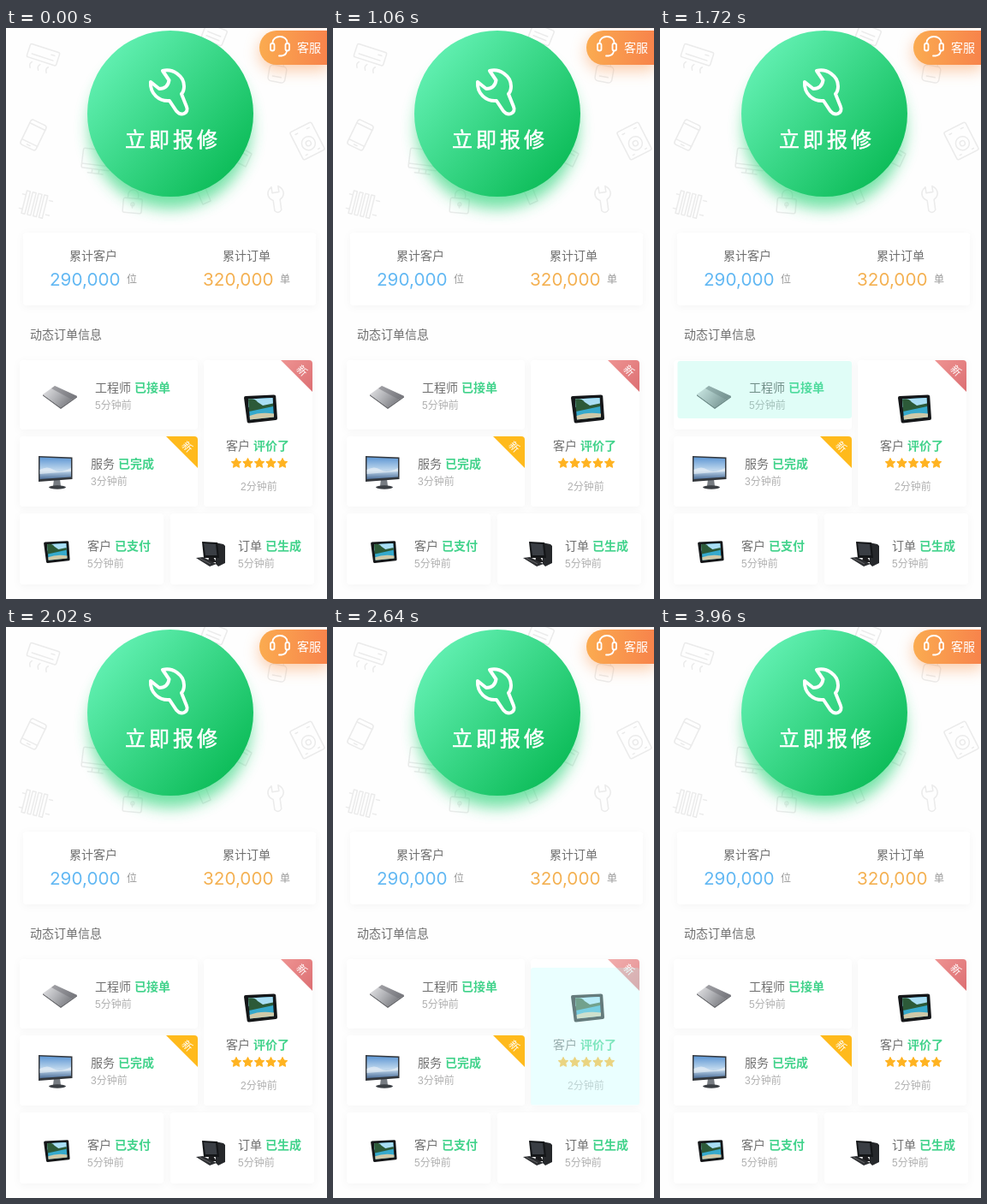
Recreate the animation shown at these times as an HTML page. Size 375x667 px, loop 3980 ms.

```html
<!DOCTYPE html>
<html lang="zh-CN">
<head>
<meta charset="utf-8">
<style>
html, body { margin: 0; width: 100%; height: 100%; overflow: hidden; background: #fefefe; }
svg { display: block; width: 375px; height: 667px; }
text { font: 14px "Liberation Sans", "Noto Sans CJK SC", "Noto Sans CJK", sans-serif; fill: #707070; }
.ok { font-weight: bold; fill: #43d38c; }
.ago, .unit { font-size: 12px; fill: #b0b0b0; }
.unit { fill: #999; }
.num { font: 20.7px Inter, sans-serif; }
.new { font-size: 12px; fill: #fff; text-anchor: middle; }
.big { font-size: 24px; letter-spacing: 4px; fill: #fff; stroke: #fff; stroke-width: .6; }
.card { fill: #fff; filter: drop-shadow(0 2px 5px rgba(0,0,0,.035)); }
.faint { fill: none; stroke: #ebebeb; stroke-width: 1.5; stroke-linejoin: round; stroke-linecap: round; }
.line { fill: none; stroke: #fff; stroke-linejoin: round; stroke-linecap: round; }
</style>
</head>
<body>
<svg viewBox="0 0 375 667">
  <defs>
    <linearGradient id="green" x1=".1" y1=".15" x2=".9" y2=".85">
      <stop stop-color="#62f0b2"/><stop offset="1" stop-color="#0cbc58"/>
    </linearGradient>
    <linearGradient id="orange">
      <stop stop-color="#fbab50"/><stop offset="1" stop-color="#f7834b"/>
    </linearGradient>
    <linearGradient id="red" x2="1" y2="1">
      <stop stop-color="#ee9392"/><stop offset="1" stop-color="#dc6e72"/>
    </linearGradient>
    <linearGradient id="sky" x2="0" y2="1">
      <stop stop-color="#5f97d4"/><stop offset=".6" stop-color="#c3daee"/><stop offset="1" stop-color="#4d6f9a"/>
    </linearGradient>
    <linearGradient id="metal" y2=".5">
      <stop stop-color="#e9e9eb"/><stop offset=".5" stop-color="#b4b5b9"/><stop offset="1" stop-color="#77787d"/>
    </linearGradient>
    <filter id="blur" x="-40%" y="-60%" width="180%" height="220%"><feGaussianBlur stdDeviation="9"/></filter>
    <path id="wrench" d="M183 50C195 47 208 56 208 68Q208 74 205 77L211 92C214 99 205 104 199 97L191 85C179 86 168 77 169 63L179 71Q189 71 190.500 61Z"/>
    <g id="tablet">
      <path d="M278 432Q278 430 280 430L313 428.500Q315 428.500 315.200 430L317 456Q317 458 315 458L284 461.500Q282 461.500 281.700 460Z" fill="#151719"/>
      <path d="M283 433.500 311.500 432 313 454.500 285 457.500Z" fill="#35a9cc"/>
      <path d="M283 433.500 311.500 432 312 440 283.500 443Z" fill="#a9def4"/>
      <path d="M283 433.500Q291 432 294 437L300 441 312 438.500V442L284 448Z" fill="#2c5a38"/>
      <path d="M284.600 453Q297 448 313 450.500V454.500L285 457.500Z" fill="#cfc9a8"/>
    </g>
  </defs>
  <rect width="375" height="667" fill="#fefefe"/>

  <g class="faint">
    <g transform="translate(42 36) rotate(18)">
      <rect x="-18" y="-13" width="36" height="16" rx="2"/>
      <path d="M-13-2H13M-10 7q-3 3 0 7M0 7q-3 3 0 7M10 7q-3 3 0 7M9-8h4"/>
    </g>
    <g transform="translate(32 125) rotate(26)">
      <rect x="-10" y="-16" width="20" height="32" rx="3"/><path d="M-10-11H10M-10 10H10M-2 13H2"/>
    </g>
    <g transform="translate(35 206) rotate(14)">
      <path d="M-18-8h4M14-8h4M-18 9h4M14 9h4"/>
      <path d="M-14-13h4v27h-4zM-7-13h4v27h-4zM0-13h4v27H0zM7-13h4v27H7z"/>
    </g>
    <g transform="translate(106 155) rotate(7)">
      <rect x="-17" y="-13" width="34" height="23" rx="2"/><path d="M-17 5H17M-4 10v5M4 10v5M-9 15H9"/>
    </g>
    <g transform="translate(148 204) rotate(5)">
      <rect x="-11" y="-5" width="22" height="17" rx="2"/><path d="M-6-5v-4a6 6 0 0 1 12 0v4M0 2v4"/><circle r="2" cy="2"/>
    </g>
    <g transform="translate(352 132) rotate(-27)">
      <rect x="-14" y="-18" width="28" height="36" rx="2"/><circle r="8" cy="3"/><circle r="3" cy="3"/><path d="M-9-13h3M6-13h3M-9 14h2M7 14h2"/>
    </g>
    <g transform="translate(243 8) rotate(22)">
      <rect x="-13" y="-10" width="26" height="19" rx="2"/><path d="M-8 4H8M-8-1H8"/>
    </g>
    <g transform="translate(317 53) rotate(10)">
      <rect x="-10" y="-9" width="20" height="19" rx="4"/><path d="M-6-9l2-6h8l2 6M-5 4H5"/>
    </g>
    <path d="M273 139l14 8-7 15-12-6M277 146l5 3"/>
    <path d="M223 190l10-3 6 15-9 4z"/>
    <g transform="translate(316 200) rotate(-8)">
      <path d="M-4-15v7h8v-7q6 4 5 10-1 4-5 6V13q-4 5-8 0V1q-4-2-5-6-1-6 5-10z"/>
    </g>
  </g>

  <circle cx="192" cy="117" r="94" fill="#35d67f" opacity=".7" filter="url(#blur)"/>
  <circle cx="192" cy="100" r="97" fill="url(#green)"/>
  <use href="#wrench" class="line" stroke-width="4"/>
  <text class="big" x="139" y="139">立即报修</text>

  <path d="M376 9H316a20 20 0 0 0 0 40h60z" fill="#f99650" opacity=".5" filter="url(#blur)"/>
  <path d="M376 3H316a20 20 0 0 0 0 40h60z" fill="url(#orange)"/>
  <g class="line" stroke-width="1.800">
    <path d="M311.500 18v-1a8.500 7 0 0 1 17 0v1M328 27q-1 5-6 5.500M319 32.500h3"/>
    <rect x="309" y="18" width="4.500" height="8.500" rx="2"/><rect x="326.500" y="18" width="4.500" height="8.500" rx="2"/>
  </g>
  <text x="340" y="28" style="fill:#fff">客服</text>

  <rect class="card" x="20" y="239" width="342" height="85" rx="4"/>
  <text x="74" y="271">累计客户</text>
  <text x="253" y="271">累计订单</text>
  <text class="num" x="51" y="301" style="fill:#62b8f3">290,000</text>
  <text class="num" x="230" y="301" style="fill:#f4b152">320,000</text>
  <text class="unit" x="141" y="298">位</text>
  <text class="unit" x="320" y="298">单</text>
  <text x="28" y="363">动态订单信息</text>

  <rect class="card" x="16" y="388" width="208" height="81" rx="4"/>
  <rect class="card" x="231" y="388" width="127" height="171" rx="4"/>
  <rect class="card" x="16" y="477" width="208" height="82" rx="4"/>
  <rect class="card" x="16" y="567" width="168" height="83" rx="4"/>
  <rect class="card" x="192" y="567" width="168" height="83" rx="4"/>

  <path d="M43 428 64 443 83 430V431.500L64 445 43 429.500Z" fill="#66676b"/>
  <path d="M43 428 57 418 83 430 64 443.500Z" fill="url(#metal)"/>
  <path d="M57 418 83 430 77 434 53 421Z" fill="#6f7075" opacity=".5"/>

  <path d="M56 527h7l1 8h-9z" fill="#777c82"/>
  <ellipse cx="60" cy="536.500" rx="10" ry="2.200" fill="#3c4045"/>
  <path d="M38 500 77.500 501.500V527L38 530Z" fill="#33373c"/>
  <path d="M39.500 501.500 76 503V524.500L39.500 527Z" fill="url(#sky)"/>
  <path d="M39.500 516q9-5 16 0t20.500-2v4l-36.500 3z" fill="#eef4f8" opacity=".6"/>

  <use href="#tablet" transform="translate(-172.700 265) scale(.78)"/>

  <path d="M244 601 254 603 256 605V625L248 629 245 626Z" fill="#26282b"/>
  <path d="M229 600 247 601 249 619 231 619Z" fill="#141618"/>
  <path d="M231 602 245 603 246.500 616 233 616Z" fill="#3a3e44"/>
  <path d="M237 618h5l4 6h-10z" fill="#1c1c1e"/>
  <path d="M222 619 230 618 246 626 238 629Z" fill="#2b2d30"/>
  <path d="M226 619.500 239 626" stroke="#777" stroke-width=".8"/>

  <g id="labels"></g>

  <path d="M187 477H220a4 4 0 0 1 4 4V514Z" fill="#ffba1c"/>
  <text class="new" transform="translate(212 489) rotate(45)" y="4.500">新</text>

  <g id="review">
    <use href="#tablet"/>
    <path d="M321 388H354a4 4 0 0 1 4 4V425Z" fill="url(#red)"/>
    <text class="new" transform="translate(346 400) rotate(45)" y="4.500">新</text>
    <text x="257" y="493">客户</text><text class="ok" x="289" y="493">评价了</text>
    <path id="stars" fill="#ffb321" stroke="#ffb321" stroke-linejoin="round"/>
    <text class="ago" x="274" y="540">2分钟前</text>
  </g>

  <rect id="flashA" x="20.500" y="389" width="203.500" height="67" rx="3" fill="#78f7dc" opacity="0"/>
  <rect id="flashB" x="231" y="398" width="127" height="160.500" rx="3" fill="#a8ffff" opacity="0"/>
</svg>
<script>
const $ = id => document.getElementById(id);

const label = (x, y, who, state, ago) => `
  <text x="${x}" y="${y}">${who}</text>
  <text class="ok" x="${x + who.length * 14 + 4}" y="${y}">${state}</text>
  <text class="ago" x="${x}" y="${y + 20}">${ago}分钟前</text>`;
$('labels').innerHTML =
  label(104, 425, '工程师', '已接单', 5) + label(99, 514, '服务', '已完成', 3) +
  label(95, 610, '客户', '已支付', 5) + label(271, 610, '订单', '已生成', 5);

const star = cx => 'M' + Array.from({length: 10}, (_, i) => {
  const r = i % 2 ? 3 : 6, a = (i / 5 - .5) * Math.PI;
  return `${cx + r * Math.cos(a)} ${508.5 + r * Math.sin(a)}`;
}).join('L') + 'Z';
$('stars').setAttribute('d', [0, 1, 2, 3, 4].map(i => star(269 + i * 13.5)).join(''));

// Rises from 0 to 1 and falls back over 600 ms
const pulse = (t, start) => {
  const p = (t - start) / 600;
  return p > 0 && p < 1 ? Math.sin(Math.PI * p) : 0;
};

function draw(now) {
  const t = now % 3980;
  const b = pulse(t, 2090) * .98;
  $('flashA').setAttribute('opacity', pulse(t, 1170) * .9);
  $('flashB').setAttribute('opacity', b);
  $('review').setAttribute('opacity', 1 - b);
  requestAnimationFrame(draw);
}
requestAnimationFrame(draw);
</script>
</body>
</html>
```
